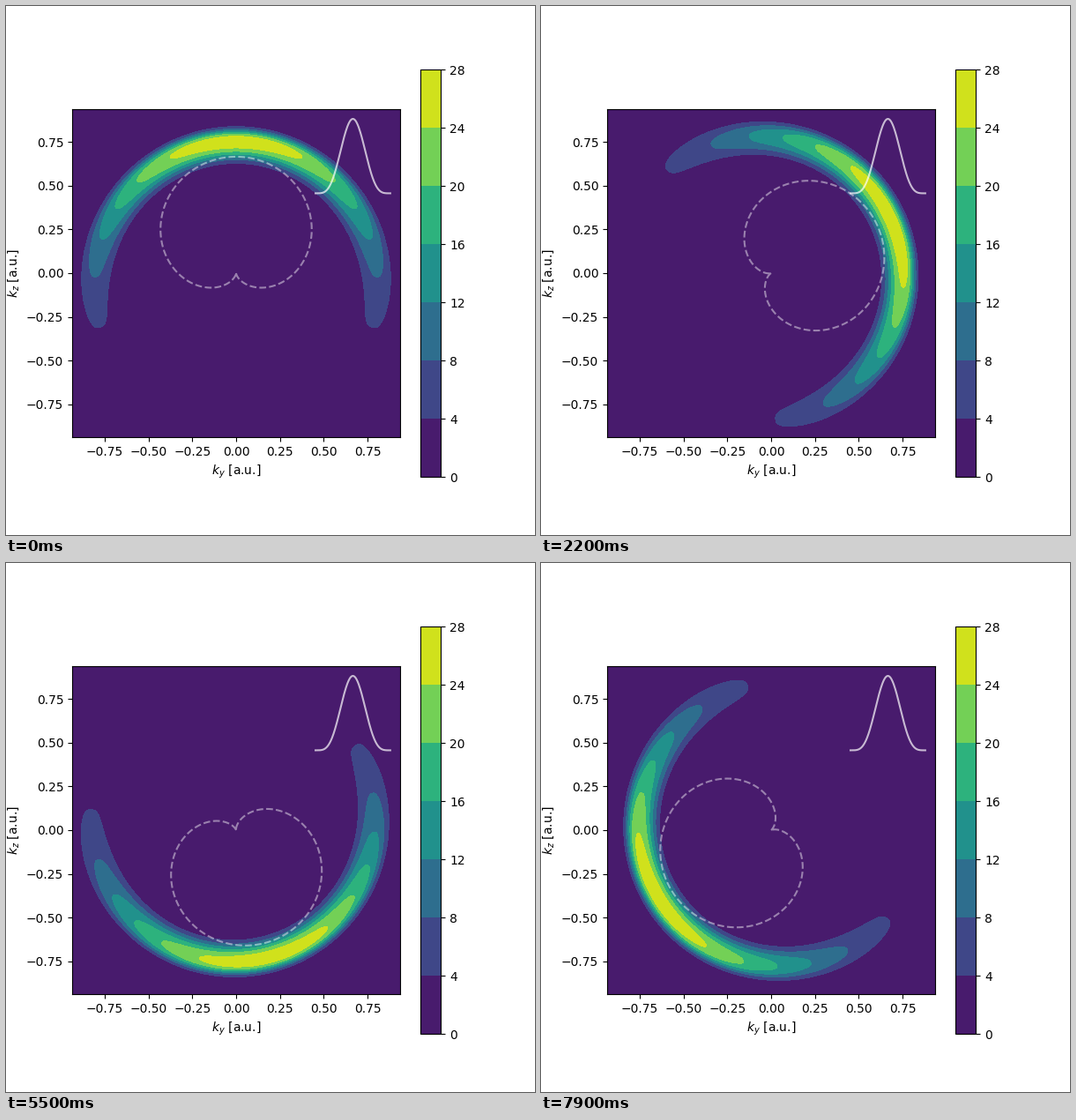
Write a matplotlib script that moves like this. It is 600x600 px and loops after 8000 ms.

```python
import numpy as np
import matplotlib.pyplot as plt
from matplotlib.animation import FuncAnimation

FRAMES, INTERVAL = 80, 100
STEPS_PER_TURN = 119
LIMIT = 0.9366
RADIUS = 0.665
LEVELS = np.arange(0, 29, 4)


def density(r, angle):
    """Skewed ring segment, drifting outwards and fading away from its peak."""
    t = np.abs(angle)
    u = r - (0.756 + 0.02 * t ** 2)
    width = np.where(u < 0, 0.1, 0.063 + 0.006 * t ** 3)
    cutoff = 1 / (1 + np.exp((t - 2.04) / 0.03))
    height = 26.7 * np.exp(-0.44 * t ** 2.15) * cutoff
    return height * np.exp(-np.abs(u / width) ** 2.5)


def polar(r, theta):
    return r * np.cos(theta), r * np.sin(theta)


phi = np.linspace(-np.pi, np.pi, 481)
r_grid, phi_grid = np.meshgrid(np.linspace(0, 1.4, 401), phi)
values = density(r_grid, phi_grid)

fig, ax = plt.subplots(figsize=(6, 6), dpi=100)
fills = []


def draw_density(peak):
    while fills:
        fills.pop().remove()
    x, y = polar(r_grid, phi_grid + peak)
    fills.append(ax.contourf(x, y, values, levels=LEVELS, cmap="viridis"))
    ax.set_xlim(-LIMIT, LIMIT)
    ax.set_ylim(-LIMIT, LIMIT)
    return fills[0]


fig.colorbar(draw_density(np.pi / 2), ax=ax)
ax.set_aspect("equal")
ax.set_facecolor(plt.get_cmap("viridis")(2 / 28))
ax.set_xlabel(r"$k_y$ [a.u.]")
ax.set_ylabel(r"$k_z$ [a.u.]")

# Pulse envelope in the corner.
s = np.linspace(-1, 1, 200)
ax.plot(0.667 + 0.2135 * s, 0.456 + 0.425 * np.cos(np.pi * s / 2) ** 4,
        color="white", alpha=0.7)

cardioid, = ax.plot([], [], "--", color="white", alpha=0.45)


def update(i):
    peak = np.pi / 2 - 2 * np.pi * i / STEPS_PER_TURN
    draw_density(peak)
    cardioid.set_data(*polar(RADIUS * np.cos(phi / 2) ** 2, phi + peak))
    return [cardioid]


anim = FuncAnimation(fig, update, frames=FRAMES, interval=INTERVAL,
                     init_func=lambda: update(0), repeat=True, repeat_delay=0)
plt.show()
```
